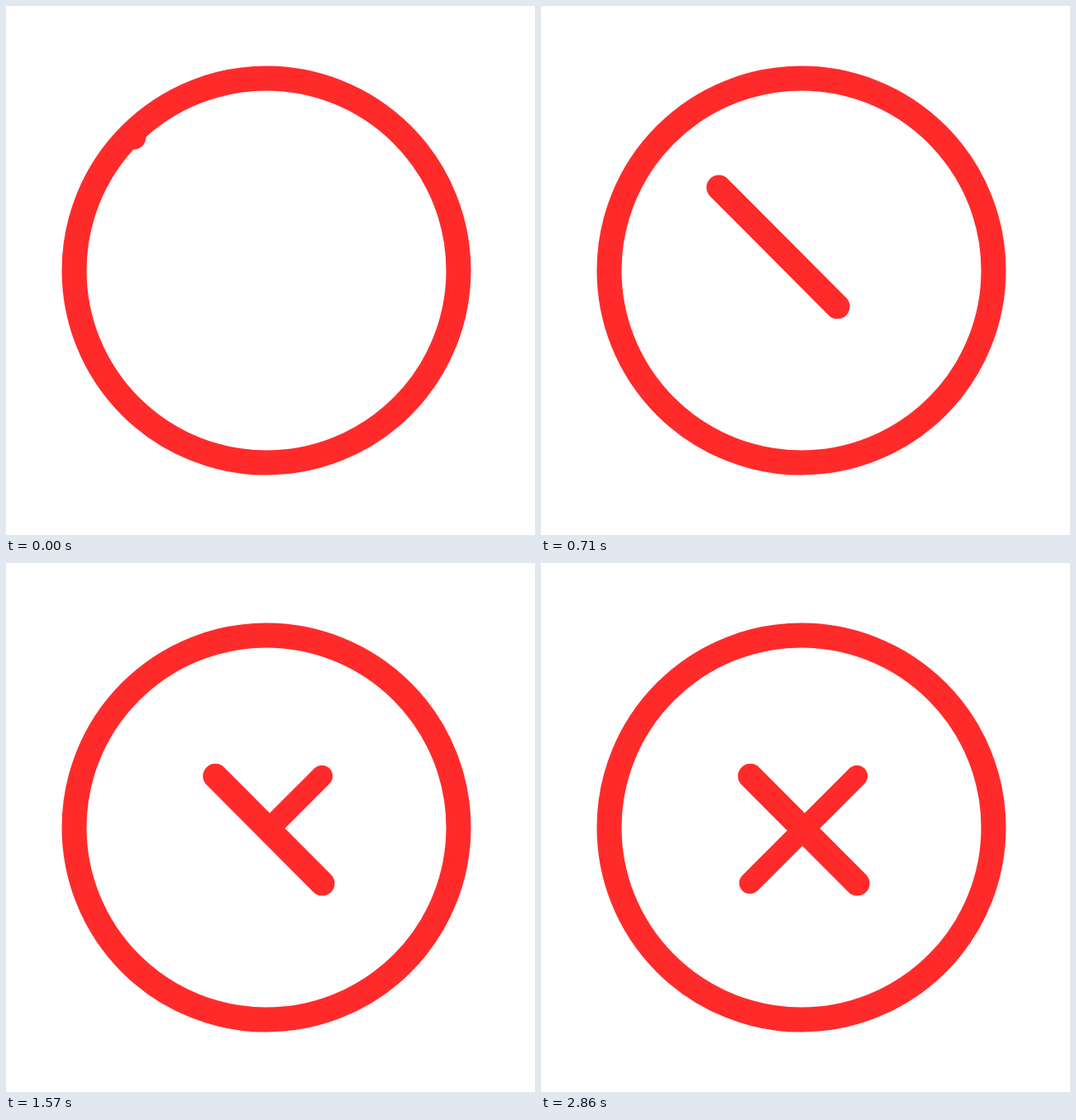
Write an HTML page that moves like this. It is 640 px wide and 640 px high and loops after 3210 ms.

```html
<!DOCTYPE html>
<html lang="en">
<head>
<meta charset="utf-8">
<title>Circled cross</title>
<style>
  html, body { margin: 0; width: 100%; height: 100%; overflow: hidden; background: #fff; }
  svg { display: block; width: 100vw; height: 100vh; fill: none; stroke: #ff2b2b; stroke-linecap: round; }
</style>
</head>
<body>
<svg viewBox="0 0 640 640">
  <circle cx="315" cy="320" r="232.5" stroke-width="30"/>
  <line id="dart" stroke-width="30"/>
  <line id="bar" stroke-width="26"/>
</svg>
<script>
const LOOP = 3210, STEP = 500 / 7, LAST = 40;

// Eased progress, one value per step
const SLIDE = [0, .135, .268, .395, .498, .615, .705, .773, .827, .865, .895, .935, .958, .977, .99, 1];
// Eased progress, one value per two steps
const DRAW = [0, .21, .415, .565, .68, .775, .855, .907, .945, .972, .99, 1];

const DART = { from: [154.4, 158.6], to: [382.6, 387.6], rest: .433, lag: 5 };
const BAR = { from: [382.2, 257.8], to: [252.8, 387.2], start: 18 };

const dart = document.getElementById('dart');
const bar = document.getElementById('bar');

function sample(table, pos) {
  const p = Math.min(Math.max(pos, 0), table.length - 1);
  const i = Math.min(Math.floor(p), table.length - 2);
  return table[i] + (table[i + 1] - table[i]) * (p - i);
}

function place(line, { from, to }, a, b) {
  const at = (axis, u) => from[axis] + (to[axis] - from[axis]) * u;
  line.setAttribute('x1', at(0, a));
  line.setAttribute('y1', at(1, a));
  line.setAttribute('x2', at(0, b));
  line.setAttribute('y2', at(1, b));
}

function render(ms) {
  const tick = Math.floor((ms % LOOP) / 10) * 10 + 5;
  const k = Math.min(Math.floor(tick / STEP), LAST);
  place(dart, DART, DART.rest * sample(SLIDE, k - DART.lag), sample(SLIDE, k));
  place(bar, BAR, 0, Math.max(sample(DRAW, (k - BAR.start) / 2), .002));
  bar.style.visibility = k < BAR.start ? 'hidden' : 'visible';
}

const begin = performance.now();
function loop() {
  render(performance.now() - begin);
  requestAnimationFrame(loop);
}
loop();
</script>
</body>
</html>
```
